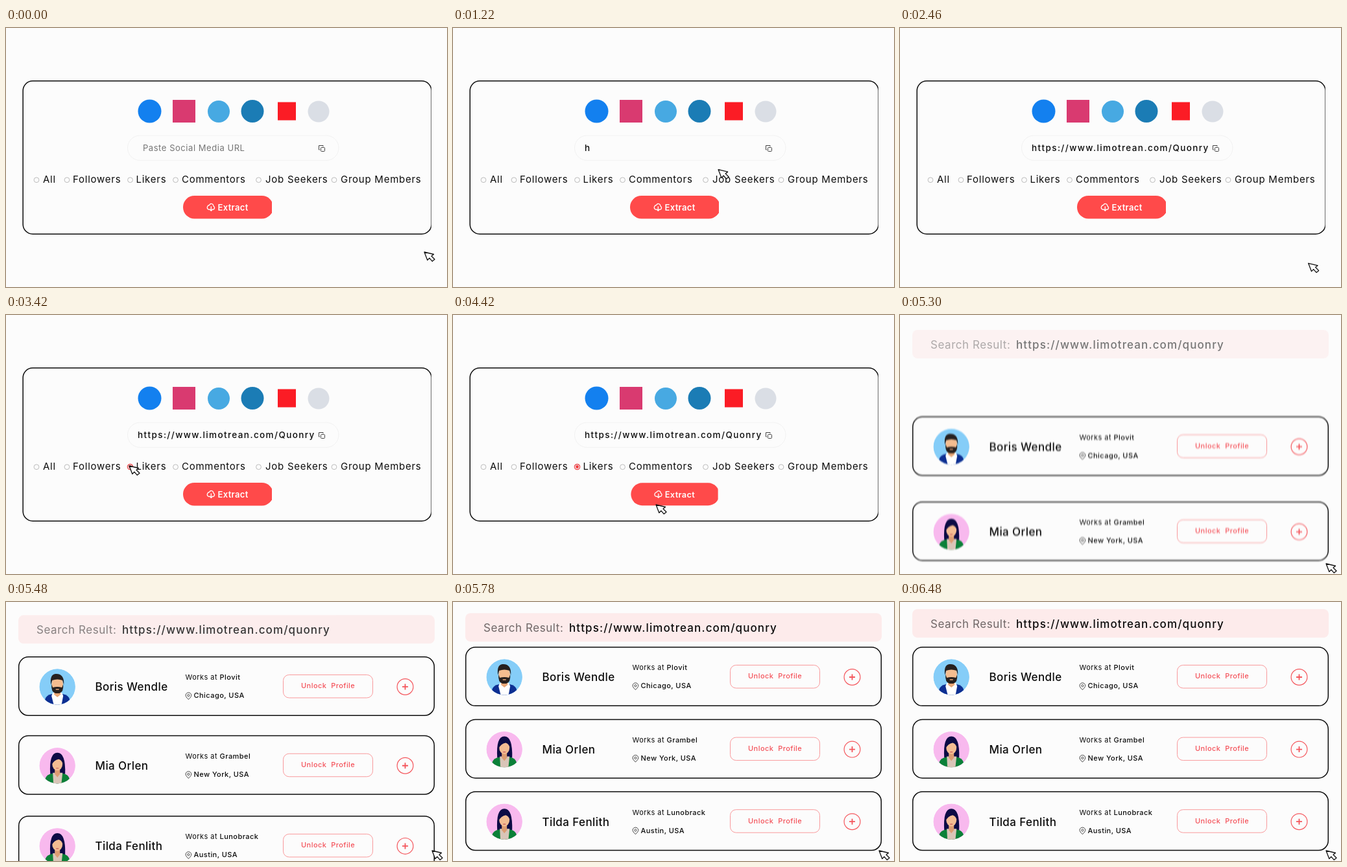
An HTML page that plays this animation: 680x400 px, repeating every 6500 ms.

```html
<!DOCTYPE html>
<html lang="en">
<head>
<meta charset="utf-8">
<title>Profile extractor</title>
<style>
  html, body { margin: 0; width: 100%; height: 100%; overflow: hidden; background: #fcfcfc; }
  svg { display: block; width: 680px; height: 400px; }
  text { font-family: Inter, "Open Sans", sans-serif; white-space: pre; fill: #0c0c0c; }
  .label { font-size: 15px; letter-spacing: .75px; }
  .hint { font-size: 13px; letter-spacing: .55px; fill: #757575; }
  .url { font-size: 13.5px; font-weight: 500; letter-spacing: 1.4px; }
  .extract { font-size: 13px; font-weight: 600; letter-spacing: .35px; fill: #fff; }
  .title { font-size: 17px; letter-spacing: .55px; fill: #6f6767; }
  .found { font-size: 17px; font-weight: 500; letter-spacing: 1.1px; }
  .name { font-size: 17px; font-weight: 500; letter-spacing: .4px; }
  .small { font-size: 11px; letter-spacing: .45px; }
  .medium { font-weight: 500; }
  .unlock { font-size: 11px; font-weight: 500; letter-spacing: .45px; fill: #f4525a; }
  .line { fill: none; stroke: #0c0c0c; stroke-width: 1.5; }
  .thin { fill: none; stroke: #444; stroke-width: 1; }
</style>
</head>
<body>
<svg viewBox="0 0 680 400">
  <defs>
    <clipPath id="cardClip"><path d="M0 0H655.8V400H0Z"/></clipPath>
    <clipPath id="buttonClip"><path d="M0 0H410V400H0Z"/></clipPath>
    <clipPath id="face"><circle r="27.7"/></clipPath>
    <filter id="smear" filterUnits="userSpaceOnUse" x="0" y="0" width="680" height="400"
            color-interpolation-filters="sRGB">
      <feGaussianBlur id="smearBlur" stdDeviation="0 0"/>
    </filter>

    <g id="man" clip-path="url(#face)">
      <circle r="28" fill="#85cdf8"/>
      <path d="M-19 30V20Q-18 13-8 11H8Q18 13 19 20V30Z" fill="#0d2f92"/>
      <path d="M-7 9-9 14-5 30H6L9 14 7 9Z" fill="#fff"/>
      <path d="M-5 5H5V12L0 16-5 12Z" fill="#e9a878"/>
      <ellipse cy="-4" rx="8.8" ry="12" fill="#f4bd90"/>
      <path d="M-10-3Q-12-19-3-20 11-21 10-3L8-10Q0-13-8-10Z" fill="#26201f"/>
      <path d="M-9-4-7 1Q0-1 7 1L9-4Q10 8 3 10H-3Q-10 8-9-4Z" fill="#26201f"/>
      <path d="M-2.5 4H2.5" stroke="#e9a878" stroke-width="1.5"/>
    </g>
    <g id="woman" clip-path="url(#face)">
      <circle r="28" fill="#f8b9ee"/>
      <path d="M-11 13Q-13-20 0-20 13-20 12 13Z" fill="#0d0b45"/>
      <path d="M-19 30V21Q-17 13-7 12H8Q17 13 19 21V30Z" fill="#0b8038"/>
      <path d="M-7 11-6 30H6L8 11Z" fill="#d9c5b8"/>
      <path d="M-4 3H4V13L0 18-4 13Z" fill="#dc9c72"/>
      <ellipse cy="-3" rx="8" ry="10.5" fill="#f3bc92"/>
      <path d="M-9-1Q-10-15 0-16 9-15 9-1 7-9 2-10-5-9-9-1Z" fill="#0d0b45"/>
      <path d="M-2 4H2" stroke="#c95858" stroke-width="1.2"/>
    </g>
  </defs>

  <g id="bar">
    <rect x="19" y="11" width="642" height="44" rx="8" fill="#fdebeb"/>
    <text class="title" x="47" y="40">Search Result:</text>
    <text class="found" x="179" y="40">https://www.limotrean.com/quonry</text>
  </g>

  <g id="rows"></g>

  <g id="form">
    <g data-lag="0">
      <rect class="line" x="26.2" y="81.8" width="629.8" height="236.4" rx="15" clip-path="url(#cardClip)"/>
    </g>
    <g data-lag="0">
      <circle cx="221.5" cy="128.5" r="18" fill="#1380ef"/>
      <rect x="257" y="111" width="35" height="35" fill="#d93a70"/>
      <circle cx="328" cy="129" r="17" fill="#47a9e2"/>
      <circle cx="380" cy="128.5" r="17.5" fill="#1b7cb5"/>
      <rect x="419" y="114.500" width="28" height="28" fill="#fb1c25"/>
      <circle cx="482" cy="129" r="16.5" fill="#dadee5"/>
    </g>
    <g data-lag="0">
      <rect x="187.500" y="166" width="325.500" height="38.500" rx="19.200" fill="#fcfcfc" stroke="#f2f2f2"/>
      <g class="thin" stroke-linejoin="round">
        <rect x="485.500" y="184.500" width="6" height="6" rx="1"/>
        <path d="M484 188H482.500V181.500H489V183"/>
      </g>
      <text id="hint" class="hint" x="211" y="190">Paste Social Media URL</text>
    </g>
    <g data-lag="0" data-end="5085"><text id="url" class="url" x="203" y="190"></text></g>
    <g data-lag="27" id="choices"></g>
    <g data-lag="35">
      <g id="button">
        <rect x="273" y="259" width="139" height="35.500" rx="17.500" fill="#ff4a4a" clip-path="url(#buttonClip)"/>
        <path d="M313 280.500Q309.500 279.500 310.500 276 311.500 273.500 313.500 273.500 315.500 270 319 272.500 320 274 319.800 275 322.500 276.500 321 279.500L319.500 280.500M316.300 276V282M314 280 316.300 282.300 318.600 280"
              fill="none" stroke="#fff" stroke-width="1.3" stroke-linecap="round"/>
        <text class="extract" x="326.500" y="282">Extract</text>
      </g>
    </g>
  </g>

  <path id="cursor" d="M0 0 14.500 3.500 11 6.200 16 11.300 12.300 14.300 8 9.300 4.800 12.500Z"
        fill="#fff" stroke="#111" stroke-width="1.3" stroke-linejoin="round"/>
</svg>

<script>
const LOOP = 6500;
const ADDRESS = 'https://www.limotrean.com/Quonry';
const $ = id => document.getElementById(id);

const choices = [
  [47, 57, 'All'], [94, 103, 'Followers'], [191.5, 200.5, 'Likers'],
  [261.5, 271, 'Commentors'], [389.5, 400, 'Job Seekers'], [506, 516, 'Group Members']
];
$('choices').innerHTML = choices.map(([dot, x, label]) => `
  <circle cx="${dot}" cy="234.7" r="3.9" fill="none" stroke="#b4b4b4" stroke-width=".9"/>
  <text class="label" x="${x}" y="239.300">${label}</text>`).join('') +
  '<g id="picked" fill="none"><circle cx="191.500" cy="234.500" r="4.200" stroke="#f4484c" stroke-width="1.200"/>' +
  '<circle cx="191.500" cy="234.500" r="2.400" fill="#f4383c"/></g>';

const people = [
  ['Boris Wendle', 'Plovit', 'Chicago, USA', 'man'],
  ['Mia Orlen', 'Grambel', 'New York, USA', 'woman'],
  ['Tilda Fenlith', 'Lunobrack', 'Austin, USA', 'woman']
];
$('rows').innerHTML = people.map(([name, firm, city, look]) => `
  <g>
    <rect class="line" x="19.700" y="0" width="640.600" height="90.500" rx="15"/>
    <use href="#${look}" x="79.200" y="46.200"/>
    <text class="name" x="137.500" y="52.500">${name}</text>
    <text class="small" x="276.500" y="35.700">Works at <tspan class="medium">${firm}</tspan></text>
    <g class="thin"><path d="M281.400 65.800Q277 61.500 277 59.500A4.400 4.400 0 0 1 285.800 59.500Q285.800 61.500 281.400 65.800Z"/>
      <circle cx="281.400" cy="59.500" r="1.600"/></g>
    <text class="small medium" x="289.500" y="63.500">${city}</text>
    <rect x="427.500" y="27.700" width="138" height="35.500" rx="9" fill="none" stroke="#f99a9c"/>
    <text class="unlock" x="455" y="48.700">Unlock  Profile</text>
    <g fill="none" stroke="#f4565c"><circle cx="615.500" cy="46.200" r="12.400" stroke-width="1.200"/>
      <path d="M611 46.200H620M615.500 41.700V50.700" stroke-width="1.800"/></g>
  </g>`).join('');

// Each leg: start time, end time, from x, y, to x, y
const legs = [
  [0, 733, 645, 346, 350, 181],
  [862, 2070, 350, 181, 642, 367],
  [2350, 3400, 642, 367, 190, 233],
  [3420, 3800, 190, 233, 240, 271],
  [3960, 4360, 240, 271, 313, 293],
  [4430, 5190, 313, 293, 657, 384]
];

const clamp = v => Math.min(1, Math.max(0, v));
const part = (t, from, to) => clamp((t - from) / (to - from));
const sine = p => (1 - Math.cos(Math.PI * p)) / 2;
const move = (el, x, y) => el.setAttribute('transform', `translate(${x.toFixed(2)} ${y.toFixed(2)})`);

const formParts = [...document.querySelectorAll('[data-lag]')];
const rows = [...$('rows').children];

function drawCursor(t) {
  const [from, to, x0, y0, x1, y1] = legs.filter(leg => leg[0] <= t).pop();
  const p = sine(part(t, from, to));
  move($('cursor'), x0 + (x1 - x0) * p, y0 + (y1 - y0) * p);
}

function drawForm(t) {
  const typed = Math.floor(Math.max(0, (t - 1163) / 31.4));
  $('url').textContent = ADDRESS.slice(0, typed);
  $('hint').style.display = t < 1150 ? '' : 'none';
  $('picked').style.display = t < 3400 ? 'none' : '';

  const press = sine(part(t, 4340, 4410)) - sine(part(t, 4450, 4540));
  $('button').setAttribute('transform',
    `translate(341.5 277) scale(${1 - .02 * press}) translate(-341.5 -277)`);

  for (const el of formParts) {
    const lag = +el.dataset.lag;
    const age = Math.max(0, t - 4570 - lag);
    move(el, 0, -91 * (age / 430) ** 2);
    el.style.opacity = 1 - part(t, 4575, +el.dataset.end || 5005);
  }
}

function drawResults(t) {
  const drift = .0086 * (6480 - t) + 9.3 * Math.exp((5000 - t) / 189);
  $('bar').style.opacity = part(t, 4933, 5600);
  move($('bar'), 0, t < 4900 ? 30 : drift);

  rows.forEach((row, i) => {
    const p = part(t, 4700 + 36 * i, 5600 + 36 * i);
    move(row, 0, 69.8 + 111.6 * i + 352 * (1 - sine(p)));
    row.style.display = p > 0 ? '' : 'none';
  });

  const blur = 1.4 * Math.sin(Math.PI * part(t, 4700, 5636));
  $('smearBlur').setAttribute('stdDeviation', `0 ${blur.toFixed(2)}`);
  $('rows').setAttribute('filter', blur > .05 ? 'url(#smear)' : 'none');
}

const start = performance.now();
function draw() {
  const t = (performance.now() - start) % LOOP;
  drawCursor(t);
  drawForm(t);
  drawResults(t);
  requestAnimationFrame(draw);
}
draw();
</script>
</body>
</html>
```
